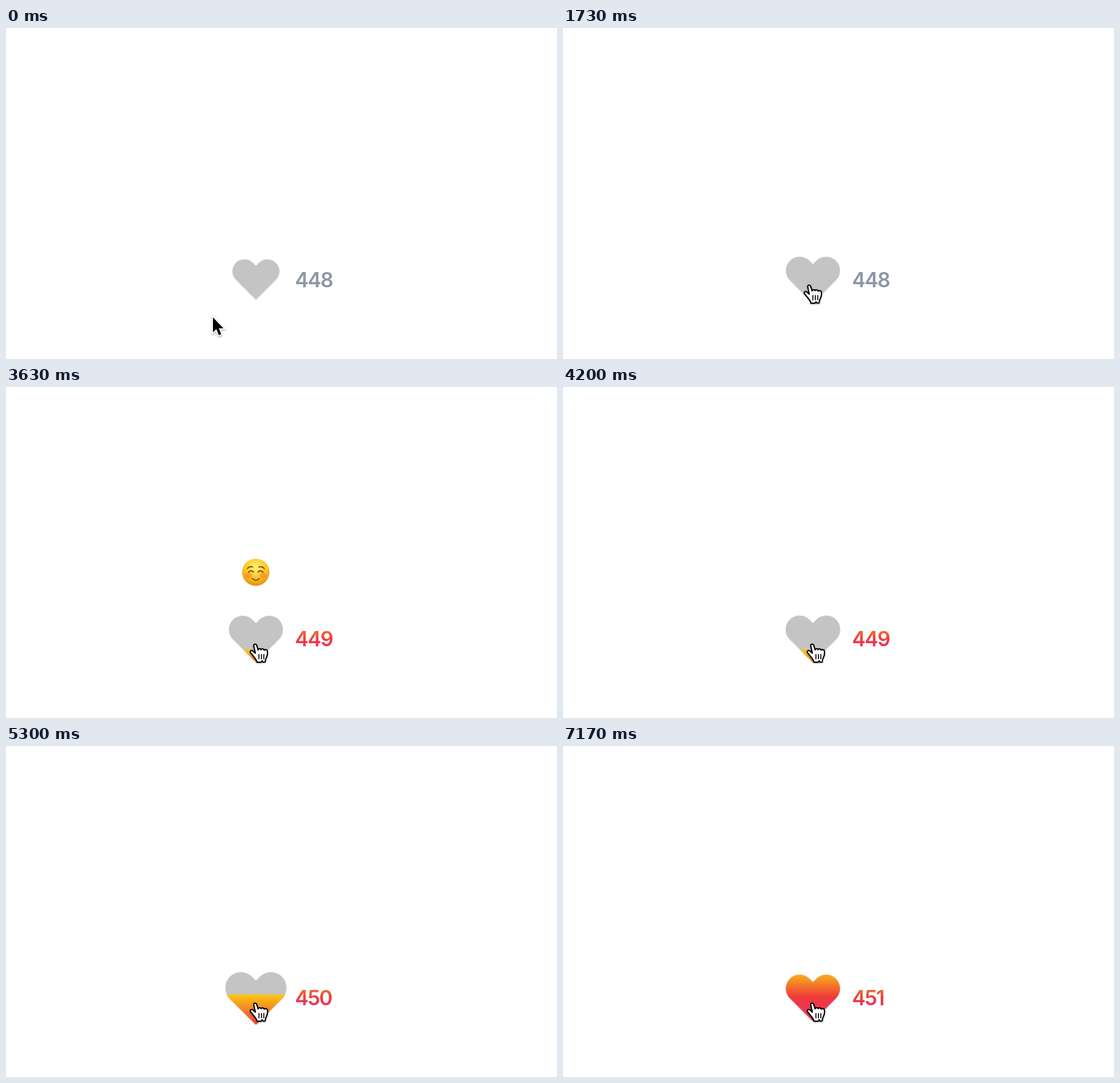
These frames come from a looping animation (900 by 540 pixels, 7210 ms). An HTML page:

```html
<!DOCTYPE html>
<html lang="en">
<head>
<meta charset="utf-8">
<title>Like button</title>
<style>
  html, body { margin: 0; width: 100%; height: 100%; overflow: hidden; background: #fff; }
  svg { display: block; width: 900px; height: 540px; }
  .count { font: 600 33.5px Inter, "Liberation Sans", sans-serif; letter-spacing: -1.6px; fill: url(#warmText); opacity: 0; }
  #c448 { fill: #8e96a6; }
  .cursor { filter: drop-shadow(0 1.5px 1.3px rgba(0, 0, 0, .4)); }
  .emoji, #hand { opacity: 0; }
  .line { fill: none; stroke: #6b3a06; stroke-width: 1.7; stroke-linecap: round; }
</style>
</head>
<body>
<svg viewBox="0 0 900 540">
  <defs>
    <path id="heart" d="M-1 37.3 L-33.1 5.2 A19.7 19.7 0 0 1 -5.2 -22.6 L0 -17.4 L5.2 -22.6 A19.7 19.7 0 0 1 33.1 5.2 L1 37.3 Q0 38.2 -1 37.3Z"/>
    <clipPath id="heartClip"><use href="#heart"/></clipPath>
    <linearGradient id="warm" x2="0" y2="1">
      <stop stop-color="#fbc912"/>
      <stop offset=".5" stop-color="#ee3a3d"/>
      <stop offset="1" stop-color="#ee346c"/>
    </linearGradient>
    <linearGradient id="warmText" gradientUnits="userSpaceOnUse" x1="0" y1="397" x2="0" y2="424">
      <stop stop-color="#f2702a"/>
      <stop offset=".5" stop-color="#ee3b3e"/>
      <stop offset="1" stop-color="#ee3560"/>
    </linearGradient>
    <radialGradient id="skin" cy=".32" r=".7">
      <stop stop-color="#fff27a"/>
      <stop offset=".55" stop-color="#fcc822"/>
      <stop offset="1" stop-color="#e58a12"/>
    </radialGradient>
    <g id="face">
      <circle r="22.3" fill="url(#skin)"/>
      <g fill="#f4672e" opacity=".4">
        <ellipse cx="-12" cy="5" rx="6" ry="4.5"/>
        <ellipse cx="12" cy="5" rx="6" ry="4.5"/>
      </g>
      <g class="line">
        <path d="M-14 -6 Q-10 -10.5 -5 -8.5 M5 -8.5 Q10 -10.5 14 -6"/>
        <path d="M-12 0 Q-8 -4.5 -3.5 -.5 M3.5 -.5 Q8 -4.5 12 0"/>
        <path d="M-6 10 Q0 16 6 10"/>
      </g>
    </g>
  </defs>

  <g class="emoji"><use href="#face"/></g>
  <g class="emoji"><use href="#face"/></g>
  <g class="emoji">
    <use href="#face"/>
    <g fill="#ea1f33" stroke="#b91022" stroke-width="3">
      <use href="#heart" transform="translate(17 -16) rotate(12) scale(.18)"/>
      <use href="#heart" transform="translate(-17.5 11.5) rotate(-8) scale(.18)"/>
      <use href="#heart" transform="translate(15 16.5) rotate(8) scale(.18)"/>
    </g>
  </g>

  <g transform="translate(408.2 405.3)">
    <g id="button">
      <use href="#heart" fill="#c4c4c4"/>
      <g clip-path="url(#heartClip)">
        <rect id="fill" x="-40" width="80" height="78" fill="url(#warm)"/>
      </g>
    </g>
  </g>

  <text class="count" id="c448" x="472" y="422.5">448</text>
  <text class="count" id="c449" x="472" y="422.5">449</text>
  <text class="count" id="c450" x="472" y="422.5">450</text>
  <text class="count" id="c451" x="472" y="422.5">451</text>

  <g id="pointer">
    <g id="arrow" class="cursor">
      <path d="M1 2 V26.5 L6.6 21.3 L10.6 31.3 L14.6 29.6 L10.6 20 H18.3 Z" stroke="#fff" stroke-width="4"/>
      <path d="M1 2 V26.5 L6.6 21.3 L10.6 31.3 L14.6 29.6 L10.6 20 H18.3 Z"/>
    </g>
    <g id="hand" class="cursor">
      <g transform="translate(-9 -1)" stroke="#000" stroke-width="2" stroke-linejoin="round" stroke-linecap="round">
        <path fill="#fff" d="M9.3 16.2 L6.8 4.5 C6.2 1 10.6 .2 11.6 3.6 L13.8 11 C14 8.5 18 8.3 18.6 10.6
          C19.2 8.8 23 8.8 23.6 11.4 C24.6 9.8 28.6 10 29 13 C29.6 17 29.2 19.5 27.6 22.5
          C26.2 25 25.6 27 25.4 30.5 L21.6 30.8 L20.4 28.6 L18.6 30.9 L12 31
          C11.6 27.5 9.5 25.5 7.2 22.6 C5.2 19.8 3.4 17.6 1.6 15.6 C0 13.2 2.6 10.9 5 12.4 Z"/>
        <path stroke-width="1.6" d="M15.2 18.3 V25.5 M19.2 18.3 V25.5 M23.2 18.3 V25.5"/>
      </g>
    </g>
  </g>
</svg>
<script>
  const LOOP = 7210, HOVER = 1415;
  const presses = [2970, 4185, 5100];
  const clicks = [3195, 4470, 5350];
  const levels = [42, 20, 0, -35];
  const $ = id => document.getElementById(id);

  // steps: [ms, properties, easing until the next step]
  function play(el, steps) {
    const all = [[0, steps[0][1]], ...steps, [LOOP, steps[steps.length - 1][1]]];
    const frames = all.map(([ms, props, easing = 'linear']) => ({ offset: ms / LOOP, easing, ...props }));
    el.animate(frames, { duration: LOOP, iterations: Infinity });
  }

  const move = (x, y) => ({ transform: `translate(${x}px, ${y}px)` });
  const scale = s => ({ transform: `scale(${s})` });
  const change = (ms, time, from, to) => [[ms, from, 'ease'], [ms + time, to]];

  function show(el, from, to) {
    const steps = [];
    if (from > 0) steps.push([from, { opacity: 0 }]);
    steps.push([from, { opacity: 1 }]);
    if (to < LOOP) steps.push([to, { opacity: 1 }], [to, { opacity: 0 }]);
    play(el, steps);
  }

  play($('pointer'), [
    [1130, move(337, 470), 'ease-in-out'],
    [1710, move(401.5, 419)],
    [1870, move(405, 419), 'ease-out'],
    [2100, move(407, 419)]
  ]);
  show($('arrow'), 0, HOVER);
  show($('hand'), HOVER, LOOP);

  play($('button'), [
    ...change(HOVER, 200, scale(1), scale(1.15)),
    ...clicks.flatMap((ms, i) => [
      ...change(presses[i], 190, scale(1.15), scale(1.3)),
      ...change(ms, 200, scale(1.3), scale(1.15))
    ])
  ]);

  play($('fill'), clicks.flatMap((ms, i) => change(ms, 300, move(0, levels[i]), move(0, levels[i + 1]))));

  [0, ...clicks].forEach((ms, i) => show($('c' + (448 + i)), ms, clicks[i] || LOOP));

  document.querySelectorAll('.emoji').forEach((el, i) => {
    const t = clicks[i];
    play(el, [
      [t, { ...move(408, 410), opacity: 0 }],
      [t + 60, { opacity: 0 }],
      [t + 200, { opacity: 1 }],
      [t + 620, { opacity: 1 }],
      [t + 720, { ...move(408, 232), opacity: .5 }],
      [t + 820, { ...move(408, 232), opacity: 0 }]
    ]);
  });
</script>
</body>
</html>
```
